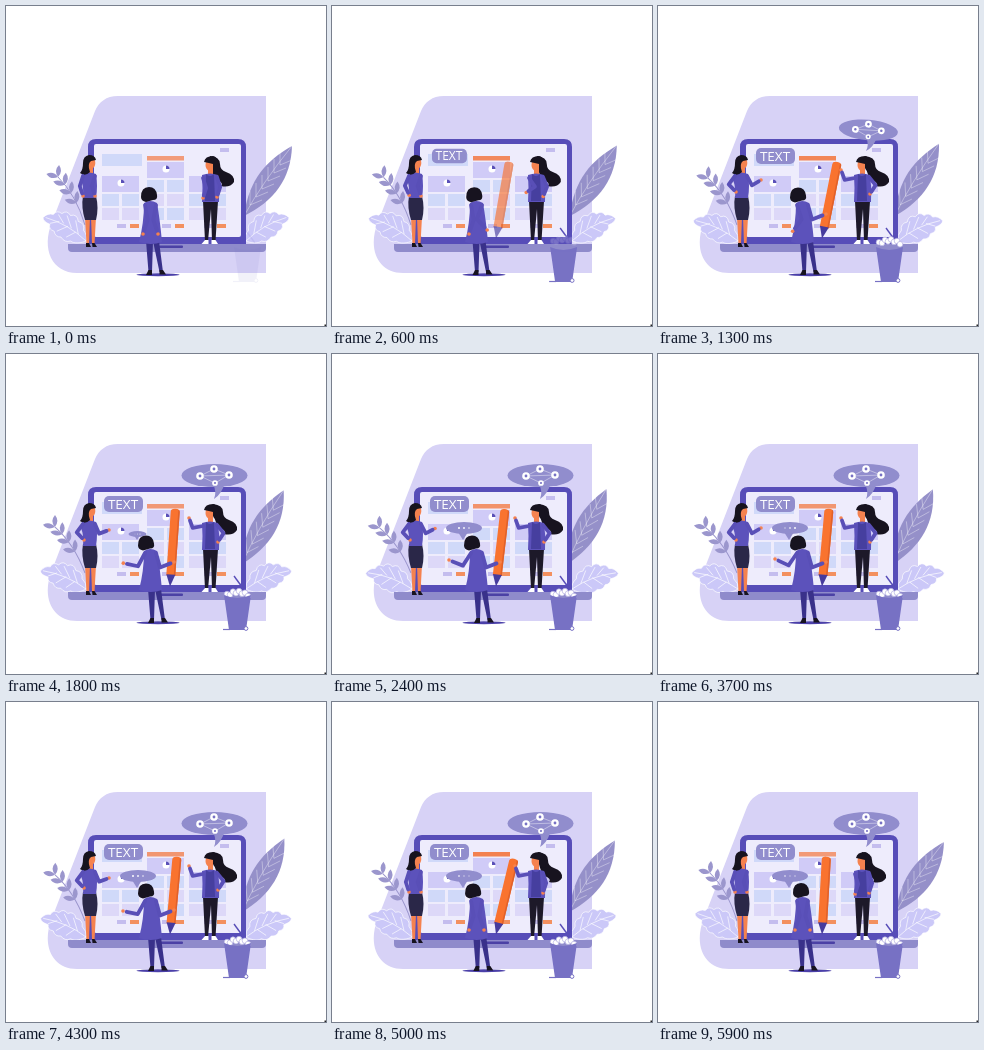
An HTML page for the animation above (6 s loop, 320x320 px).

```html
<!DOCTYPE html>
<html lang="en">
<head>
<meta charset="utf-8">
<title>Team designing a page</title>
<style>
html, body { margin: 0; width: 100%; height: 100%; overflow: hidden; background: #fff }
svg { display: block; width: 100%; height: 100% }
.sleeve { fill: none; stroke: #594fb7; stroke-width: 3.8; stroke-linecap: round; stroke-linejoin: round }
.skin { fill: #f5824f }
.hair { fill: #17131f }
.top { fill: #5c52bb }
.bubble { fill: #918dcd }
.vein { fill: none; stroke: #fff; stroke-width: .7 }
</style>
</head>
<body>
<svg viewBox="0 0 320 320">
  <defs>
    <g id="frond">
      <path fill="#cbc8f8" stroke="#fff" stroke-width=".7" d="M0 0C5 2 14 3 18 0Q25 2 29-4Q36-4 37-10Q44-12 42-17Q50-20 50-24Q44-29 38-27Q34-32 28-28Q22-32 18-26Q10-28 9-20Q1-18 3-11Q-2-6 0 0Z"/>
      <path class="vein" d="M0 0Q20-17 47-24M9-7L12-21M17-13L22-26M26-18L32-27M12-9L23-4M21-15L34-10M31-20L42-18"/>
    </g>
    <g id="pie"><circle r="3.5" fill="#fff"/><path fill="#5a50b8" d="M0 0V-3.500A3.500 3.500 0 0 1 3.500 0Z"/></g>
    <g id="node"><circle r="3.800" fill="#fff"/><circle r="1.400" fill="#7771c4"/></g>
  </defs>

  <path fill="#d7d2f6" d="M260 90H112C100 90 93 96 89 105L46 216C35 243 46 267 71 267H260Z"/>

  <g id="blade">
    <path fill="#9590c9" d="M0-25C5-62 22-80 48-95C47-62 30-40 0-25Z"/>
    <path id="ribs" class="vein" stroke-opacity=".5"/>
  </g>
  <g id="frondRight"><use href="#frond" transform="scale(.86 .98)"/></g>
  <g id="frondLeft"><use href="#frond" transform="scale(-.86 .98)"/></g>
  <g id="sprig"><path fill="none" stroke="#9b96cd" d="M0 0Q-9-30-27-48"/></g>

  <path fill="#574db8" d="M82 238V141Q82 133 90 133H232Q240 133 240 141V238Z"/>
  <rect x="88" y="138" width="147" height="93" rx="2" fill="#eeecfc"/>
  <g id="page"></g>
  <path fill="#8f8bcb" d="M62 238H260V242Q260 246 256 246H66Q62 246 62 242Z"/>
  <rect x="153" y="239.500" width="24" height="2.500" rx="1" fill="#4b41a5"/>

  <g id="bin">
    <path stroke="#574db8" stroke-width="1.4" d="M228 222L239 237"/>
    <g id="paper" fill="#fff" stroke="#aaa5dd" stroke-width=".6"></g>
    <path fill="#7771c4" d="M218 241Q231 247 245 241L240 276H223Z"/>
    <path stroke="#7771c4" stroke-width="1.2" d="M217 275.500H224"/>
    <circle cx="240" cy="274.500" r="1.900" fill="#fff" stroke="#7771c4"/>
  </g>

  <g id="label">
    <rect x="98" y="142" width="39" height="16" rx="5" class="bubble"/>
    <text x="117" y="155" text-anchor="middle" font-family="'Open Sans', sans-serif" font-size="13.500" fill="#fff">TEXT</text>
  </g>

  <g id="network">
    <path class="bubble" d="M207 130Q211 138 208 145Q216 140 219 128Z"/>
    <ellipse cx="208.500" cy="121.500" rx="33" ry="11.500" class="bubble"/>
    <path class="vein" stroke-opacity=".6" d="M194 122L208 115L223 121L209 129ZL223 121"/>
    <use href="#node" x="208" y="115"/><use href="#node" x="194" y="122"/>
    <use href="#node" x="223" y="121"/><use href="#node" transform="translate(209 129) scale(.75)"/>
  </g>

  <g id="chat">
    <path class="bubble" d="M126 178L131 186L136 178Z"/>
    <ellipse cx="132" cy="174" rx="18" ry="6" class="bubble"/>
    <g id="dots" fill="#fff"></g>
  </g>

  <g id="pencil">
    <path fill="#f9732f" d="M-4.500-11V-75Q-4.500-78 0-78Q4.500-78 4.500-75V-11Z"/>
    <path fill="#e0612a" d="M3-11V-77Q4.500-77 4.500-75V-11Z"/>
    <path fill="#463b9d" d="M-4.500-12H4.500L0 0Z"/>
  </g>

  <g id="presenter">
    <path class="skin" d="M79 211H84L83 238H80.500ZM85 211H90L88.500 238H86Z"/>
    <path class="hair" d="M80 237H83L85 241H80ZM86 237H88.500L91 241H86.500Z"/>
    <path fill="#2a2748" d="M77 190H90Q93 202 90 214H79Q75 201 77 190Z"/>
    <path class="skin" d="M82 160H87V168H82Z"/>
    <path class="top" d="M76 168Q83 165 90 168Q92 180 90 192H77Q78 181 75 174Z"/>
    <ellipse cx="85.500" cy="157" rx="3.800" ry="5.500" class="skin"/>
    <path class="hair" d="M90 154Q89 149 83 149Q77 150 77 157Q77 164 74 167Q79 171 84 166Q81 158 85 155Z"/>
  </g>

  <g id="speaker">
    <path fill="#1d1929" d="M197 195H212L209.500 235H206L205 203L202 235H199Z"/>
    <path fill="#fff" d="M199 234H202.500V238H195.500ZM205.500 234H209.500L212 238H205.500Z"/>
    <g id="mane"><path class="hair" d="M207 150Q217 151 217 158Q217 164 223 166Q232 169 231 176Q227 182 218 180Q221 177 214 174Q209 170 208 160Z"/></g>
    <path class="skin" d="M202 160H207V170H202Z"/>
    <path class="top" d="M196 169Q204 166 212 169Q214 182 213 196H196Q197 182 196 169Z"/>
    <path fill="#463f9f" d="M200 168Q204 172 208 168L209 195H199Z"/>
    <ellipse cx="203.500" cy="159" rx="4" ry="5.800" class="skin"/>
    <path class="hair" d="M198 156Q199 150 207 150Q214 151 213 166Q206 166 207 158Q203 157 198 156Z"/>
  </g>

  <ellipse cx="152" cy="268.700" rx="21.500" ry="1.500" fill="#4b40a9"/>
  <g id="legs">
    <path fill="#39318a" d="M140 235H147L146 266H142.500ZM147 235H153L157 266H153.500Z"/>
    <path class="hair" d="M142.500 264H146V269H140ZM153.500 264H157L160 268.500H153.500Z"/>
  </g>
  <path class="top" d="M138 197Q144 193 151 197Q154 214 156 236Q145 240 133 236Q138 217 138 197Z"/>
  <path id="bob" class="hair" d="M143 181Q150 181 151 189Q152 194 147 194L140 196Q135 195 135 191Q135 181 143 181Z"/>

  <g id="arms"></g>
  <rect x="318.500" y="318.500" width="1.500" height="1.500" fill="#222"/>
</svg>
<script>
const LOOP = 6000, STEP = 100;
const $ = id => document.getElementById(id);

function add(parent, tag, attrs) {
  const el = document.createElementNS('http://www.w3.org/2000/svg', tag);
  for (const key in attrs) el.setAttribute(key, attrs[key]);
  return $(parent).appendChild(el);
}
const place = (id, transform) => $(id).setAttribute('transform', transform);
const fade = (id, opacity) => $(id).setAttribute('opacity', opacity);
const ramp = (t, from, to) => Math.min(1, Math.max(0, (t - from) / (to - from)));
const smooth = k => k * k * (3 - 2 * k);
const ease = (t, from, to) => smooth(ramp(t, from, to));
const wave = (t, period) => (1 - Math.cos(2 * Math.PI * t / period)) / 2;
const mix = (a, b, k) => a.map((v, i) => v + (b[i] - v) * k);
const growAt = (x, y, k, turn = 0) => `translate(${x} ${y}) rotate(${turn}) scale(${k}) translate(${-x} ${-y})`;

// Page: three columns, each a card with small blocks below
const box = (x, y, width, height, fill) => add('page', 'rect', { x, y, width, height, fill });
box(214, 142, 9, 4, '#c4bdee');
box(96, 148, 40, 12, '#d0d9f9');
const headline = box(141, 150, 37, 4.5, '#f3814f');
[96, 141, 183].forEach((x, col) => {
  const top = col === 1 ? 156 : 170;
  box(x, top, 37, 16, '#d0cbf7');
  add('page', 'use', { href: '#pie', x: x + 19, y: top + 7 });
  for (let y = top + 18, row = 0; y < 210; y += 14, row++)
    for (const half of [0, 20]) box(x + half, y, 17, 12, row % 2 ? '#ddd8f8' : '#d0d9f9');
  box(x + 15, 218, 9, 4, '#c4bdee');
  box(x + 28, 218, 9, 4, '#f3905f');
});

// Sprig: leaf pairs along the curved stem
for (let u = .4; u < 1.05; u += .2)
  for (const turn of [195, 275])
    add('sprig', 'path', {
      d: 'M0 0Q6-5 12 0Q6 5 0 0Z', fill: '#9b96cd',
      transform: `translate(${-18 * u - 9 * u * u} ${-60 * u + 12 * u * u}) rotate(${turn})`
    });

// Leaf ribs fan out from the midrib
let ribs = 'M0-25Q18-58 48-95';
for (let i = 0; i < 6; i++) ribs += `M${6 + 6 * i} ${-36 - 8 * i}l0-14m0 14l12-5`;
$('ribs').setAttribute('d', ribs);

for (let i = 0; i < 8; i++)
  add('paper', 'circle', { cx: 221 + i * 3, cy: 240 - 3 * Math.sin(i * Math.PI / 7) + i % 2 * 2, r: 2.8 });
for (let i = 0; i < 3; i++) add('dots', 'circle', { cx: 127 + 5 * i, cy: 174, r: 1 });

// Arms hang down, then reach for a point; the elbow follows from two equal bones
const arm = options => ({
  length: 21, start: 400, end: 4400, sway: 0, ...options,
  hand: add('arms', 'circle', { r: 1.8, class: 'skin' }),
  sleeve: add('arms', 'path', { class: 'sleeve' })
});
const arms = [
  arm({ shoulder: [77, 170], reach: [78, 186], bend: 1 }),
  arm({ shoulder: [89, 170], reach: [103, 174], bend: 1, start: 600, sway: 2 }),
  arm({ shoulder: [197, 172], reach: [183, 164], bend: -1, end: 5000 }),
  arm({ shoulder: [211, 171], reach: [212, 188], bend: -1 }),
  arm({ shoulder: [139, 199], reach: [117, 205], bend: -1, length: 30, start: 1150, sway: 4 }),
  arm({ shoulder: [150, 199], reach: [168, 208], bend: 1, length: 30 })
];

function drawArm({ shoulder, reach, bend, length, start, end, sway, hand, sleeve }, t) {
  const k = ease(t, start, start + 700) * (1 - ease(t, end, end + 600));
  const [sx, sy] = shoulder;
  const rest = [sx + (sx % 2 ? -2 : 2) * (length > 25), sy + length - 1];
  let [hx, hy] = mix(rest, reach, k);
  hy += sway * k * Math.sin(2 * Math.PI * (t - 3700) / 2400);
  const dx = hx - sx, dy = hy - sy, d = Math.hypot(dx, dy);
  const out = bend * Math.sqrt(Math.max(0, length * length - d * d)) / 2 / d;
  const elbow = [sx + dx / 2 - dy * out, sy + dy / 2 + dx * out];
  sleeve.setAttribute('d', `M${shoulder}L${elbow}L${mix(elbow, [hx, hy], .75)}`);
  hand.setAttribute('cx', hx);
  hand.setAttribute('cy', hy);
}

function draw(t) {
  const breeze = wave(t, LOOP);
  place('blade', `translate(238 235) rotate(${-7.5 * breeze})`);
  place('frondRight', `translate(240 235) rotate(${11 * breeze})`);
  place('frondLeft', `translate(80 235) rotate(${-11 * breeze})`);
  place('sprig', `translate(79 219) rotate(${-6 * breeze})`);

  const arrive = ease(t, -150, 650), fall = 1 - ramp(t, 1200, 1600);
  place('bin', `translate(${11 * (1 - arrive)} 0)`);
  fade('bin', arrive);
  place('paper', `translate(0 ${-5 * fall})`);
  fade('paper', ramp(t, 500, 1000));

  const open = ease(t, 700, 1450);
  place('label', growAt(117, 150, ease(t, 200, 700)));
  place('network', growAt(208, 145, open, 50 * (1 - open)));
  place('chat', growAt(131, 186, ease(t, 1500, 2100)));
  [...$('dots').children].forEach((dot, i) => dot.setAttribute('opacity', .25 + .75 * wave(t - i * 150, 950)));

  place('pencil', `translate(164 232.5) rotate(${3 + 10.5 * wave(t, 2000)})`);
  fade('pencil', ease(t, 300, 800));
  headline.setAttribute('opacity', .75 + .25 * wave(t, 2000));

  const lean = ease(t, 300, 1200) * (1 - ease(t, 4600, 5600));
  place('bob', `translate(${-3 * lean} ${.6 * lean})`);
  place('legs', `translate(${2 * lean} 0)`);
  place('mane', `translate(${-3 * (1 - lean)} 0)`);
  arms.forEach(each => drawArm(each, t));
}

const start = performance.now();
(function tick() {
  const t = Math.max(0, performance.now() - start) % LOOP;
  draw(Math.floor(t / STEP) * STEP);
  requestAnimationFrame(tick);
})();
</script>
</body>
</html>
```
